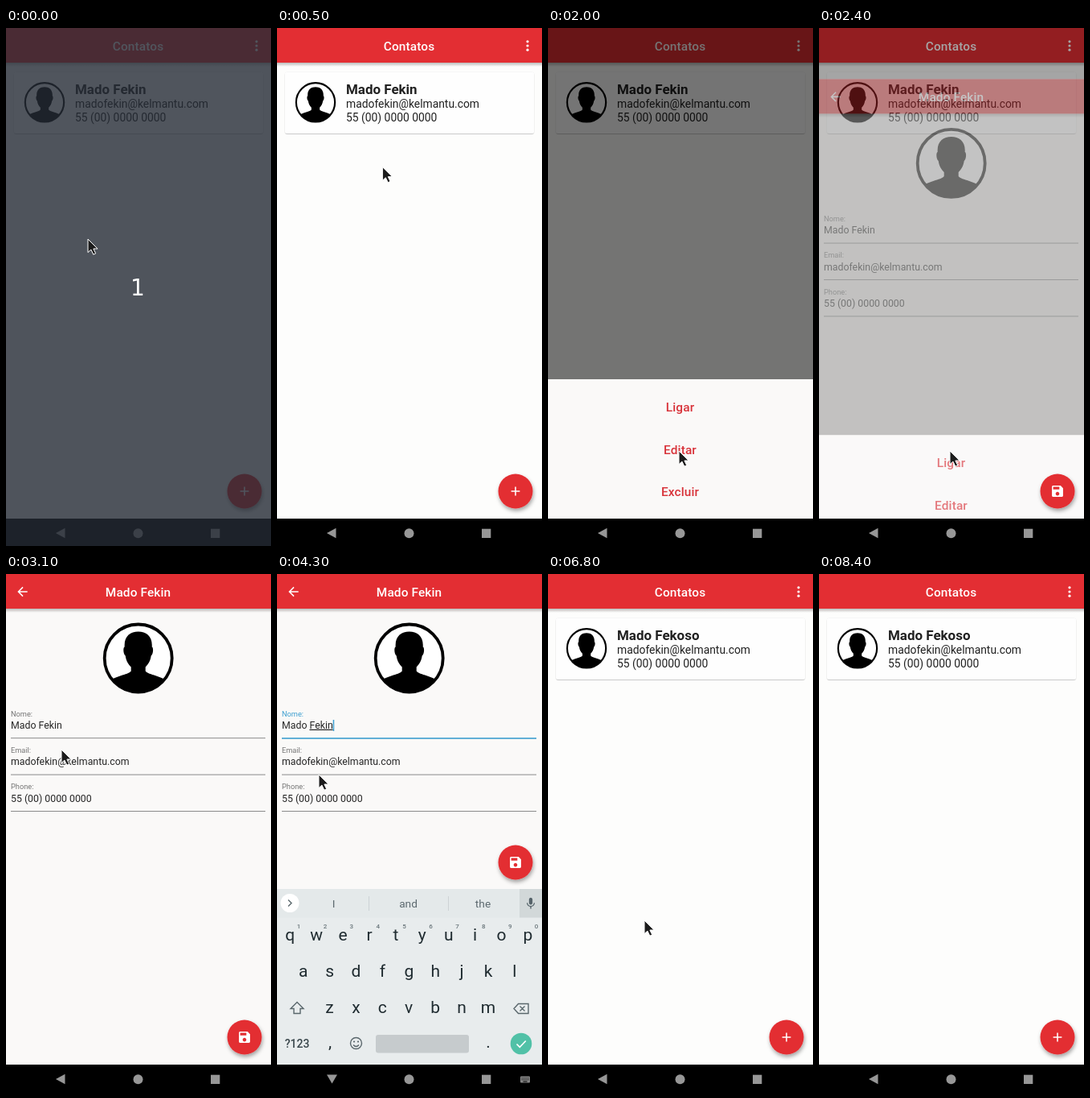
Animation, 330 px wide and 643 px high, one loop 8800 ms. Source, as an HTML page:

```html
<!DOCTYPE html>
<html lang="pt">
<head>
<meta charset="utf-8">
<title>Contatos</title>
<style>
html, body { margin: 0; width: 100%; height: 100%; overflow: hidden; background: #000; }
svg { display: block; width: 330px; height: 643px; font-family: Roboto, sans-serif; }
.mid { text-anchor: middle; }
.title { font-size: 15.4px; font-weight: 500; letter-spacing: .12px; text-anchor: middle; fill: #fff; }
.action { font-size: 15.4px; font-weight: 500; letter-spacing: .12px; text-anchor: middle; fill: #d8333a; }
.name { font-size: 16.94px; font-weight: 700; fill: #212121; }
.info { font-size: 13.86px; fill: #212121; }
.label { font-size: 9.24px; fill: #757575; }
.value { font-size: 12.32px; fill: #262626; }
.key { font-size: 21px; text-anchor: middle; fill: #1f2b30; }
.hint { font-size: 8px; font-weight: 500; text-anchor: middle; fill: #6b777c; }
.sug { font-size: 13.7px; text-anchor: middle; fill: #5c696f; }
.line { fill: none; stroke: #5a676c; stroke-width: 1.4; }
</style>
</head>
<body>
<svg id="stage" viewBox="0 0 330 643" xmlns="http://www.w3.org/2000/svg"></svg>
<script>
const LOOP = 8800, STEP = 100;
const RED = '#e32e33', PAGE = '#faf9f8', BLUE = '#3d9fd0';
const FIRST = 'Mado', MAIL = 'madofekin@kelmantu.com', PHONE = '55 (00) 0000 0000';

const text = (cls, x, y, s, id = '') => `<text class="${cls}" x="${x}" y="${y}"${id && ` id="${id}"`}>${s}</text>`;
const rect = (x, y, w, h, fill, more = '') => `<rect x="${x}" y="${y}" width="${w}" height="${h}" fill="${fill}" ${more}/>`;
const icon = (x, y, d, fill = '#fff', k = .77) =>
  `<path transform="translate(${x} ${y}) scale(${k}) translate(-12 -12)" fill="${fill}" d="${d}"/>`;

const ICON = {
  plus: 'M19 13h-6v6h-2v-6H5v-2h6V5h2v6h6v2z',
  save: 'M17 3H5c-1.1 0-2 .9-2 2v14c0 1.1.9 2 2 2h14c1.1 0 2-.9 2-2V7l-4-4zm-5 16c-1.66 0-3-1.34-3-3s1.34-3 3-3 3 1.34 3 3-1.34 3-3 3zm3-10H5V5h10v4z',
  back: 'M20 11H7.8l5.6-5.6L12 4l-8 8 8 8 1.4-1.4L7.8 13H20z',
  mic: 'M12 14c1.66 0 3-1.34 3-3V5c0-1.66-1.34-3-3-3S9 3.34 9 5v6c0 1.66 1.34 3 3 3zm5.3-3c0 3-2.54 5.1-5.3 5.1S6.7 14 6.7 11H5c0 3.4 2.7 6.2 6 6.7V21h2v-3.3c3.3-.5 6-3.3 6-6.7z'
};

const header = `${rect(0, 43, 330, 5, 'url(#drop)')}${rect(0, 0, 330, 43, RED)}`;

function avatar(x, y, k) {
  return `<g transform="translate(${x} ${y}) scale(${k})">
    <circle r="42" fill="#fff"/>
    <path clip-path="url(#disc)" d="M-17-14C-18-27-10-33 0-33S18-27 17-14C19-14 19-5 16-3C15 4 12 8 9 11V16
      C13 21 30 22 36 29V46H-36V29C-30 22-13 21-9 16V11C-12 8-15 4-16-3C-19-5-19-14-17-14Z"/>
    <circle r="42" fill="none" stroke="#000" stroke-width="3.8"/></g>`;
}

const fab = glyph => `<circle cx="297" cy="575" r="21.5" fill="${RED}" filter="url(#lift)"/>${glyph}`;

const list = `${rect(0, 0, 330, 609, '#fdfdfc')}${header}
  ${text('title', 164.5, 27.5, 'Contatos')}
  ${[16.8, 22, 27.2].map(y => `<circle cx="312" cy="${y}" r="1.6" fill="#fff"/>`).join('')}
  ${rect(9.5, 54.5, 311, 76.5, '#fefefe', 'rx="3.5" filter="url(#card)"')}
  ${avatar(48, 92.3, .575)}
  ${text('name', 86, 82, '', 'listName')}${text('info', 86, 99.3, MAIL)}${text('info', 86, 115.5, PHONE)}
  <g id="listFab">${fab(icon(297, 575, ICON.plus))}</g>`;

const sheet = rect(0, 0, 330, 173, PAGE) +
  ['Ligar', 'Editar', 'Excluir'].map((s, i) => text('action', 164.5, 40.3 + 52.3 * i, s)).join('');

const field = (i, label, value) => {
  const y = 45.4 * i;
  return text('label', 6, 176.6 + y, label, 'label' + i) + text('value', 6, 191.8 + y, value, 'value' + i) +
    rect(6, 203.2 + y, 317, 1, '#8b8b8b', `id="rule${i}"`);
};

const edit = `${rect(0, 0, 330, 609, PAGE)}${header}
  ${icon(20.5, 22, ICON.back)}${text('title', 164.5, 27.5, '', 'editTitle')}
  ${avatar(164.7, 104.5, 1)}
  ${field(0, 'Nome:', '')}${field(1, 'Email:', MAIL)}${field(2, 'Phone:', PHONE)}
  ${rect(0, 181, 1.5, 14, BLUE, 'id="caret"')}`;

const row = (letters, x, y) => [...letters].map((c, i) => text('key', x + 32.9 * i, y, c)).join('');

const keyboard = `${rect(0, 391, 330, 218, '#e8eced')}
  ${rect(0, 391, 330, 35.5, '#e4e9ea')}${rect(302, 391, 28, 35.5, '#d2d8d9')}
  <circle cx="16" cy="408.5" r="11.5" fill="#fff"/><path class="line" d="M14 404.5l4 4-4 4" stroke-width="1.8"/>
  ${rect(114, 400, 1, 18, '#cdd3d5')}${rect(213, 400, 1, 18, '#cdd3d5')}
  ${[0, 1, 2].map(i => text('sug', 70.5 + 93 * i, 414, '', 'sug' + i)).join('')}
  ${icon(316, 409, ICON.mic, '#56636a', .72)}
  ${row('qwertyuiop', 16.3, 455)}${row('asdfghjkl', 32.7, 500)}${row('zxcvbnm', 65.5, 545)}
  ${[...'1234567890'].map((c, i) => text('hint', 27 + 32.9 * i, 439.5, c)).join('')}
  <path class="line" d="M25 531.5l8 8h-4v6h-8v-6h-4z"/>
  <path class="line" d="M300.5 533.5h12.5v12h-12.5l-5.5-6zM302.5 536.5l6 6m0-6l-6 6"/>
  <text class="mid" x="25" y="588" font-size="14" font-weight="500" fill="#39464b">?123</text>
  ${text('key', 66, 588, ',')}${text('key', 263, 588, '.')}
  <circle class="line" cx="98.5" cy="582.5" r="7"/><path class="line" d="M95 584.5q3.5 4 7 0"/>
  <circle cx="96" cy="580.5" r="1.1" fill="#5a676c"/><circle cx="101" cy="580.5" r="1.1" fill="#5a676c"/>
  ${rect(123, 572, 116, 22.5, '#c6cbcd', 'rx="3"')}
  <circle cx="304" cy="583" r="13.3" fill="#51c1a7"/>
  <path d="M298.5 583.5l3.8 3.8 7.5-7.8" fill="none" stroke="#fff" stroke-width="1.7"/>`;

const nav = `${rect(0, 609, 330, 34, '#000')}<g fill="#979797">
  <path id="navBack" d="M62 627l11.5-6.3v12.6z"/>
  <g id="navKeys"><path d="M62 621.5h13l-6.5 11z"/>${rect(303, 623.5, 12, 8, '#858585', 'rx="1"')}
    <path d="M304.5 625.8h9M304.5 627.8h9" stroke="#000" stroke-dasharray="1 1"/>
    <path d="M306.5 630h5" stroke="#000"/></g>
  <circle cx="164.5" cy="627.2" r="6"/>${rect(255, 621.7, 11.3, 11.3, '#979797')}</g>`;

document.getElementById('stage').innerHTML = `<defs>
  <linearGradient id="drop" x2="0" y2="1"><stop stop-opacity=".26"/><stop offset="1" stop-opacity="0"/></linearGradient>
  <filter id="lift" x="-40%" y="-40%" width="180%" height="180%"><feDropShadow dx="1" dy="3" stdDeviation="2.4" flood-opacity=".36"/></filter>
  <filter id="card" x="-5%" y="-10%" width="110%" height="120%"><feDropShadow dx="0" dy=".5" stdDeviation=".7" flood-opacity=".4"/></filter>
  <clipPath id="disc"><circle r="42"/></clipPath></defs>
  <g>${list}</g>
  ${rect(0, 0, 330, 609, '#000', 'id="dim"')}
  <g id="sheet">${sheet}</g>
  <g id="edit">${edit}</g>
  <g id="keyboard">${keyboard}</g>
  <g id="heroFab">${fab(`<g id="heroSave">${icon(297, 575, ICON.save)}</g><g id="heroPlus">${icon(297, 575, ICON.plus)}</g>`)}</g>
  ${nav}
  <g id="count">${rect(0, 0, 330, 643, '#252b35', 'opacity=".8"')}
    <text class="mid" x="164" y="332" font-size="28" fill="#fff" style="font-family:'DejaVu Sans',sans-serif">1</text></g>
  <path id="pointer" d="M0 0V16.6l3.9-3.5 2.9 6.1 2.9-1.4-2.8-5.8h5.2z" fill="#1c1c1c" stroke="#fff" stroke-width="1"/>`;

const el = {};
document.querySelectorAll('#stage [id]').forEach(n => el[n.id] = n);
const set = (n, attrs) => { for (const a in attrs) el[n].setAttribute(a, attrs[a]); };
const show = (n, on) => { el[n].style.display = on ? '' : 'none'; };
const shift = (n, x, y) => set(n, { transform: `translate(${x} ${y})` });

// Keys are [time, value, ...]; straight lines in between.
function along(t, keys, i = 1) {
  if (t <= keys[0][0]) return keys[0][i];
  for (let k = 1; k < keys.length; k++) {
    const a = keys[k - 1], b = keys[k];
    if (t <= b[0]) return a[i] + (b[i] - a[i]) * (t - a[0]) / (b[0] - a[0]);
  }
  return keys[keys.length - 1][i];
}
const latest = (t, states) => states.filter(s => s[0] <= t).pop();

const DIM = [[800, 0], [900, .15], [1000, .57], [1100, .9], [1200, 1], [2300, 1], [2400, .65], [2500, .2], [2600, 0]];
const SHEET = [[800, 0], [900, .07], [1000, .341], [1100, .85], [1200, 1], [2300, 1], [2400, .6], [2500, .1], [2600, 0]];
const EDIT = [[2300, 0], [2400, .35], [2500, .8], [2600, 1], [6500, 1], [6600, .8], [6700, .3], [6800, 0]];
const KEYS = [[3600, 0], [3700, .35], [3800, .85], [3900, 1], [6500, 1], [6600, .6], [6700, .1], [6800, 0]];
const FAB = [[3600, 0], [3700, .35], [3800, .85], [3900, 1], [6500, 1], [6600, .85], [6700, .35], [6800, 0]];
const POINTER = [
  [200, 102, 262], [700, 151, 113], [1000, 151, 113], [1700, 161, 559], [2000, 163, 525], [2700, 163, 525],
  [3100, 69, 218], [3500, 54, 186], [3700, 54, 186], [4100, 52, 249], [5800, 52, 249], [6200, 318, 390],
  [6400, 302, 364], [6600, 302, 364], [6800, 120, 430], [6900, 120, 430], [7000, 104, 421], [7200, 104, 421],
  [7400, 99, 383], [7800, 297, 603], [7900, 297, 603], [8300, 12, 4], [8400, 10, -30]
];
const TYPED = [[0, 'Fekin'], [4500, 'Feki'], [4700, 'Fek'], [5100, 'Feko'], [5200, 'Fekos'], [5300, 'Fekoso']];
const HINTS = [
  [0, 'I', 'and', 'the'], [4400, 'Fekin', 'Fekins', 'Feking'], [4600, 'Feki', 'Fekin', 'Feking'],
  [4700, 'Fek', 'Feks', 'Feki'], [5100, 'Feko', 'Fekos', 'Fekon'],
  [5200, 'Fekos', 'Feko s', 'Feko so'], [5300, 'Fekoso', 'Feko so', 'Feko some']
];

function draw(t) {
  const last = latest(t, TYPED)[1], full = `${FIRST} ${last}`;
  const focus = t >= 3600 && t < 6600;
  const page = along(t, EDIT), kb = along(t, KEYS);

  show('count', t < 200);
  el.listName.textContent = t < 6500 ? `${FIRST} Fekin` : full;
  set('dim', { opacity: .54 * along(t, DIM) });
  shift('sheet', 0, 609 - 173 * along(t, SHEET));

  show('edit', page > 0);
  set('edit', { opacity: page });
  shift('edit', 0, 150 * (1 - page) ** 2);
  el.editTitle.textContent = full;
  const line = t >= 4300 && t < 6600 ? 'underline' : 'none';
  el.value0.innerHTML = `${FIRST} <tspan text-decoration="${line}">${last}</tspan>`;
  el.label0.style.fill = focus ? BLUE : '';
  set('rule0', { fill: focus ? BLUE : '#8b8b8b', height: focus ? 1.6 : 1 });
  show('caret', focus && !(t >= 4100 && t < 4300) && !(t >= 5800 && t < 6300));
  if (page > 0) set('caret', { x: 6 + el.value0.getComputedTextLength() });

  show('keyboard', kb > 0);
  shift('keyboard', 0, 218 * (1 - kb));
  latest(t, HINTS).slice(1).forEach((s, i) => { el['sug' + i].textContent = s; });

  const hero = t >= 2400 && t < 7000;
  show('heroFab', hero);
  show('listFab', !hero);
  shift('heroFab', 0, -217 * along(t, FAB));
  show('heroSave', t < 6700);
  show('heroPlus', t >= 6700);

  const up = t >= 3600 && t < 6700;
  show('navKeys', up);
  show('navBack', !up);
  shift('pointer', along(t, POINTER, 1), along(t, POINTER, 2));
}

function tick() {
  const t = performance.now() % LOOP;
  draw(Math.floor(t / STEP) * STEP);
  requestAnimationFrame(tick);
}
tick();
</script>
</body>
</html>
```
